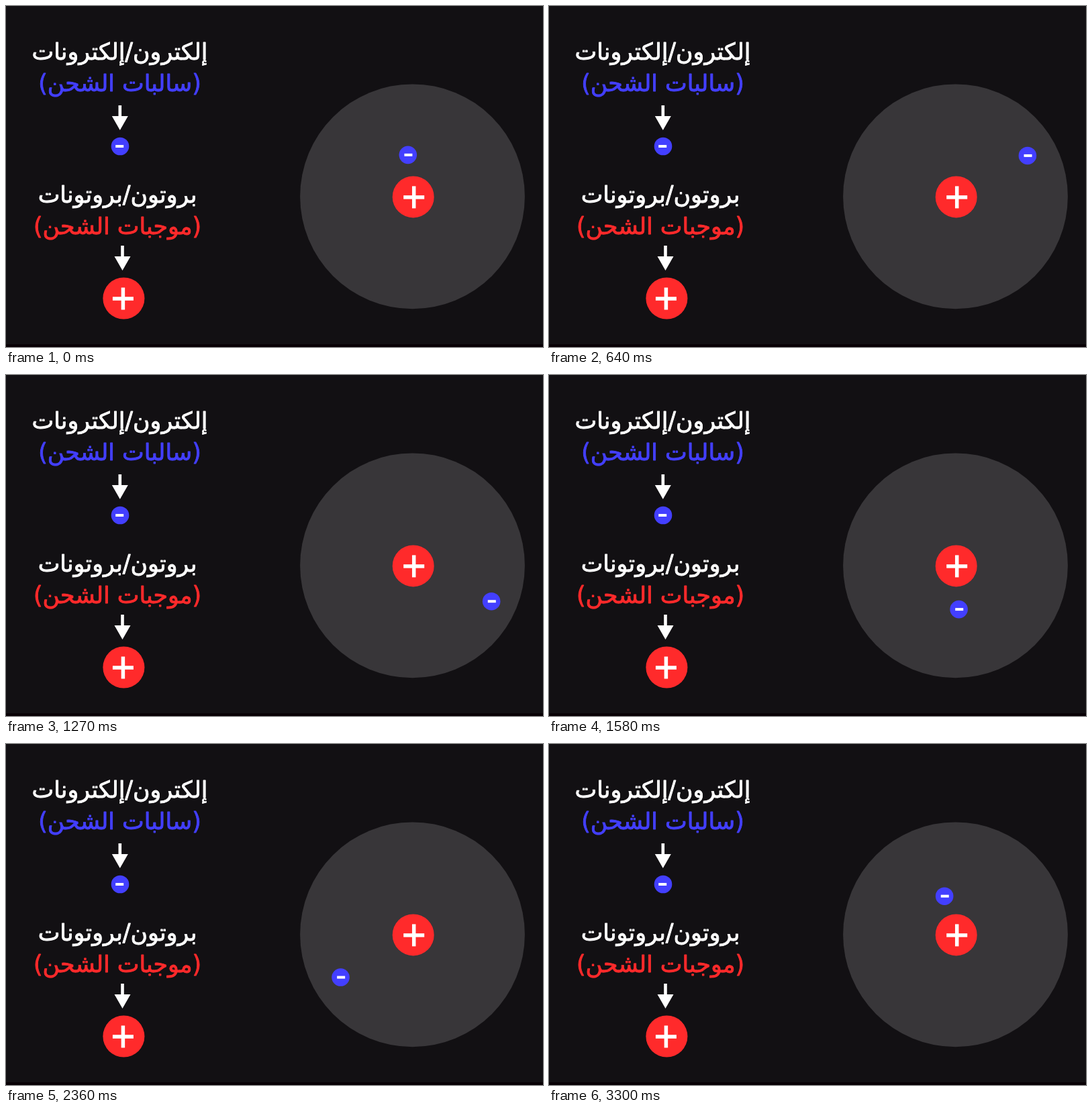
Animation, 800 px wide and 508 px high, one loop 3.33 s. Source, as an HTML page with a canvas:

```html
<!DOCTYPE html>
<html lang="ar">
<head>
<meta charset="utf-8">
<style>
  html, body { margin: 0; width: 100%; height: 100%; overflow: hidden; background: #121013; }
  canvas { display: block; }
</style>
</head>
<body>
<canvas id="stage" width="800" height="508"></canvas>
<script>
const ctx = document.getElementById('stage').getContext('2d');
const LOOP = 3330;
const WHITE = '#ffffff', BLUE = '#433fff', RED = '#ff2a2b';
const FAMILY = '"DejaVu Sans", sans-serif';
const TITLE = 'إلكترون/إلكترونات';

// Key points of the electron's orbit: time, x, y
const orbit = [
  [0, 598.5, 222], [360, 656, 153], [690, 715, 237], [940, 676.5, 304],
  [1220, 730, 334], [1580, 610.8, 349], [1940, 604.5, 401],
  [2350, 500, 350], [2760, 491.8, 227], [3270, 577.5, 241.5], [3300, 588.8, 227]
];

function keyPoint(i) {
  const turn = Math.floor(i / orbit.length);
  const [t, x, y] = orbit[i - turn * orbit.length];
  return [t + turn * LOOP, x, y];
}

// Closed cubic Hermite curve with slopes weighted by the time spans
function electronAt(t) {
  let i = orbit.length - 1;
  while (orbit[i][0] > t) i--;
  const [a, b, c, d] = [i - 1, i, i + 1, i + 2].map(keyPoint);
  const span = c[0] - b[0], u = (t - b[0]) / span;
  const slope = (p, q, r, k) => {
    const h = q[0] - p[0], g = r[0] - q[0];
    return ((q[k] - p[k]) / h * g + (r[k] - q[k]) / g * h) / (h + g);
  };
  return [1, 2].map(k => {
    const m = slope(a, b, c, k) * span, n = slope(b, c, d, k) * span;
    const e = c[k] - b[k];
    return b[k] + u * (m + u * (3 * e - 2 * m - n + u * (m + n - 2 * e)));
  });
}

function disc(x, y, r, color) {
  ctx.fillStyle = color;
  ctx.beginPath();
  ctx.arc(x, y, r, 0, 2 * Math.PI);
  ctx.fill();
}

function bar(x, y, w, h) {
  ctx.fillStyle = WHITE;
  ctx.fillRect(x - w / 2, y - h / 2, w, h);
}

function electron(x, y, shift) {
  disc(x, y, 13.3, BLUE);
  bar(x + shift, y, 12, 4);
}

function proton(x, y, shift) {
  disc(x, y, 31, RED);
  bar(x + shift, y + 0.5, 31, 5.5);
  bar(x + shift, y + 0.5, 5.5, 33);
}

function arrow(x, y) {
  bar(x, y + 8.5, 4.6, 17);
  ctx.beginPath();
  ctx.moveTo(x - 12, y + 16);
  ctx.lineTo(x + 12, y + 16);
  ctx.lineTo(x, y + 37);
  ctx.fill();
}

// A thin outline gives the letters a medium weight
function label(text, x, y, color) {
  ctx.fillStyle = ctx.strokeStyle = color;
  ctx.fillText(text, x, y);
  ctx.strokeText(text, x, y);
}

function legend(x, y, title, note, color) {
  label(title, x, y, WHITE);
  label(note, x, y + 47, color);
}

ctx.font = '36px ' + FAMILY;
const size = 36 * 262 / ctx.measureText(TITLE).width;
ctx.font = size + 'px ' + FAMILY;
ctx.textAlign = 'center';
ctx.direction = 'rtl';
ctx.lineJoin = 'round';
ctx.lineWidth = 0.9;

function draw(t) {
  ctx.fillStyle = '#121013';
  ctx.fillRect(0, 0, 800, 508);
  ctx.fillStyle = '#080005';
  ctx.fillRect(0, 504, 800, 4);

  legend(169.5, 80, TITLE, '(سالبات الشحن)', BLUE);
  arrow(169.8, 148);
  electron(170, 209, -0.8);

  legend(166, 293, 'بروتون/بروتونات', '(موجبات الشحن)', RED);
  arrow(173.5, 357);
  proton(175.4, 435.5, -1);

  disc(605.5, 283.8, 167.4, '#383639');
  proton(606.7, 284.4, 1);
  electron(...electronAt(t), 0.6);
}

const start = performance.now();
function frame() {
  draw((performance.now() - start) % LOOP);
  requestAnimationFrame(frame);
}
frame();
</script>
</body>
</html>
```
